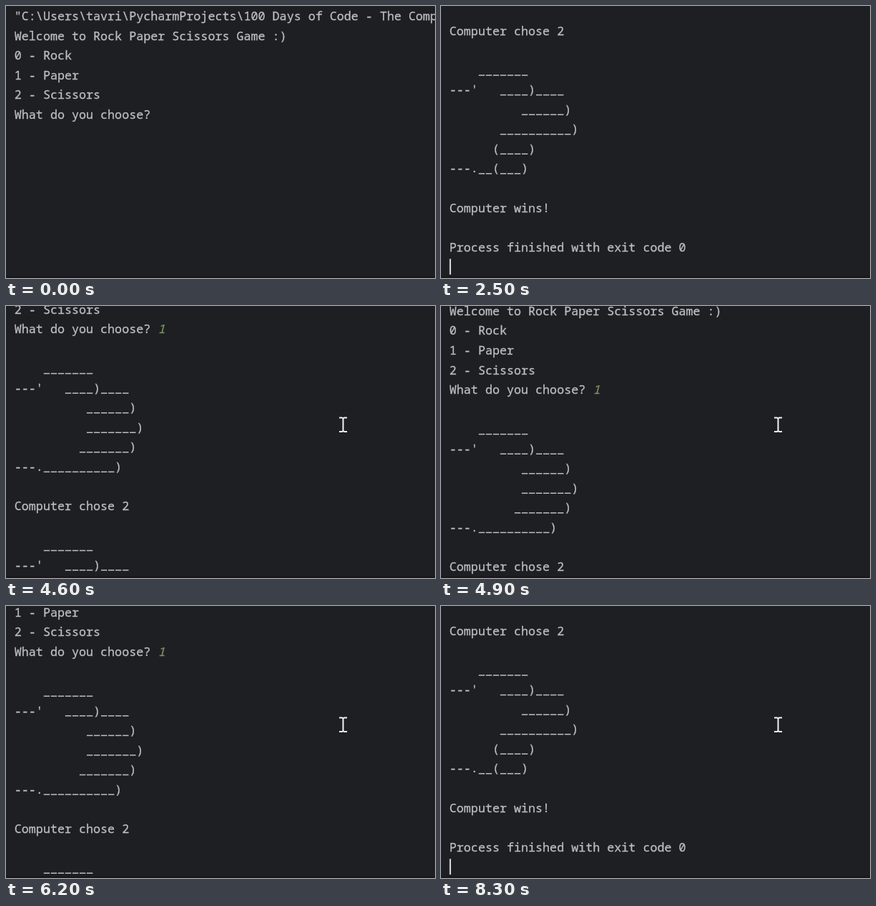
Write an HTML page that moves like this. It is 600x381 px and loops after 8400 ms.

```html
<!DOCTYPE html>
<html lang="en">
<head>
<meta charset="utf-8">
<title>Rock Paper Scissors</title>
<style>
  html, body { margin: 0; width: 100%; height: 100%; overflow: hidden; background: #1e1f22; }
  svg { display: block; }
  text {
    font: 16.72px "Noto Sans Mono", "DejaVu Sans Mono", monospace;
    fill: #bcbec4; stroke: #bcbec4; stroke-width: 0.3; white-space: pre;
  }
  .rule { fill: #bcbec4; }
  .typed { fill: #7a9263; stroke: #7a9263; font-style: italic; }
</style>
</head>
<body>
<svg id="stage" width="600" height="381" viewBox="0 0 600 381">
  <g id="console"></g>
  <rect y="378.5" width="600" height="2.5" fill="#1b171c"/>
  <path id="pointer" d="M466 156.5h4l1.5 1 1.5-1h4M466 176h4l1.5-1 1.5 1h4M471.5 157v18.5"
        fill="none" stroke="#f4f4f4" stroke-width="2"/>
</svg>
<script>
const LOOP = 8400, STEP = 100;
const LEFT = 11.8, ADVANCE = 10.032, BASELINE = 20.1, PITCH = 27.55;
const TYPED_AT = 1000, ENTER_AT = 1400, OUTPUT_AT = 1700, POINTER_AT = 3200;

const prompt = [
  '"C:\\Users\\tavri\\PycharmProjects\\100 Days of Code - The Complete',
  "Welcome to Rock Paper Scissors Game :)",
  "0 - Rock",
  "1 - Paper",
  "2 - Scissors",
  "What do you choose? "
];
const output = [
  "",
  "    _______",
  "---'   ____)____",
  "          ______)",
  "          _______)",
  "         _______)",
  "---.__________)",
  "",
  "Computer chose 2",
  "",
  "    _______",
  "---'   ____)____",
  "          ______)",
  "       __________)",
  "      (____)",
  "---.__(___)",
  "",
  "Computer wins!",
  "",
  "Process finished with exit code 0"
];

// [time, value] keys, linear in between
const scrollKeys = [
  [1600, 0], [1700, 365.2], [3600, 365.2], [3700, 355.2], [3800, 325], [3900, 285], [4000, 255],
  [4400, 255], [4500, 190], [4600, 119.7], [4700, 75], [4800, 48], [4900, 34.7],
  [5900, 34.7], [6000, 44], [6100, 62], [6200, 88], [6600, 245], [6800, 330],
  [6900, 354.2], [7000, 362], [7100, 365.2]
];
const pointerX = [[3200, 117], [3300, 78], [3400, 36], [3500, 10], [3600, 0]];
const pointerY = [[3200, 60], [3400, 18], [3600, 0]];

const consoleGroup = document.getElementById("console");
const pointer = document.getElementById("pointer");
const columnX = column => LEFT + column * ADVANCE;
const rowY = row => BASELINE + row * PITCH;

function add(parent, tag, attributes, content = "") {
  const node = document.createElementNS("http://www.w3.org/2000/svg", tag);
  for (const name in attributes) node.setAttribute(name, attributes[name]);
  node.textContent = content;
  parent.append(node);
  return node;
}

// Underscores become separate short rules, leaving gaps between columns.
function addLine(parent, line, row) {
  [...line].forEach((char, column) => {
    if (char === "_") add(parent, "rect", {
      class: "rule", x: columnX(column) + 0.8, y: rowY(row) + 0.6, width: 8.4, height: 1.5
    });
  });
  add(parent, "text", { x: LEFT, y: rowY(row) }, line.replace(/_/g, " "));
}

prompt.forEach((line, row) => addLine(consoleGroup, line, row));
const typed = add(consoleGroup, "text", { class: "typed", x: columnX(20), y: rowY(5) }, "1");
const result = add(consoleGroup, "g", {});
output.forEach((line, i) => addLine(result, line, prompt.length + i));
const caret = add(consoleGroup, "rect", { width: 2.2, height: 22, fill: "#ced0d6" });

function valueAt(keys, time) {
  const next = keys.findIndex(key => key[0] > time);
  if (next === 0) return keys[0][1];
  if (next < 0) return keys[keys.length - 1][1];
  const [t0, v0] = keys[next - 1], [t1, v1] = keys[next];
  return v0 + (v1 - v0) * (time - t0) / (t1 - t0);
}

function show(node, visible) {
  node.setAttribute("visibility", visible ? "visible" : "hidden");
}

function placeCaret(time) {
  let row = 5, column = 20;
  if (time >= OUTPUT_AT) [row, column] = [26, 0];
  else if (time >= ENTER_AT) [row, column] = [6, 0];
  else if (time >= TYPED_AT) column = 21;
  caret.setAttribute("x", columnX(column));
  caret.setAttribute("y", rowY(row) - 17);
  const held = time >= TYPED_AT && time < 1900;
  show(caret, held || (time + 900) % 1000 < 500);
}

function draw(now) {
  const time = Math.floor(now % LOOP / STEP) * STEP;
  consoleGroup.setAttribute("transform", `translate(0 ${-valueAt(scrollKeys, time)})`);
  pointer.setAttribute("transform", `translate(${valueAt(pointerX, time)} ${valueAt(pointerY, time)})`);
  show(typed, time >= TYPED_AT);
  show(result, time >= OUTPUT_AT);
  show(pointer, time >= POINTER_AT);
  placeCaret(time);
}

const start = performance.now();
function tick() {
  draw(performance.now() - start);
  requestAnimationFrame(tick);
}
tick();
</script>
</body>
</html>
```
